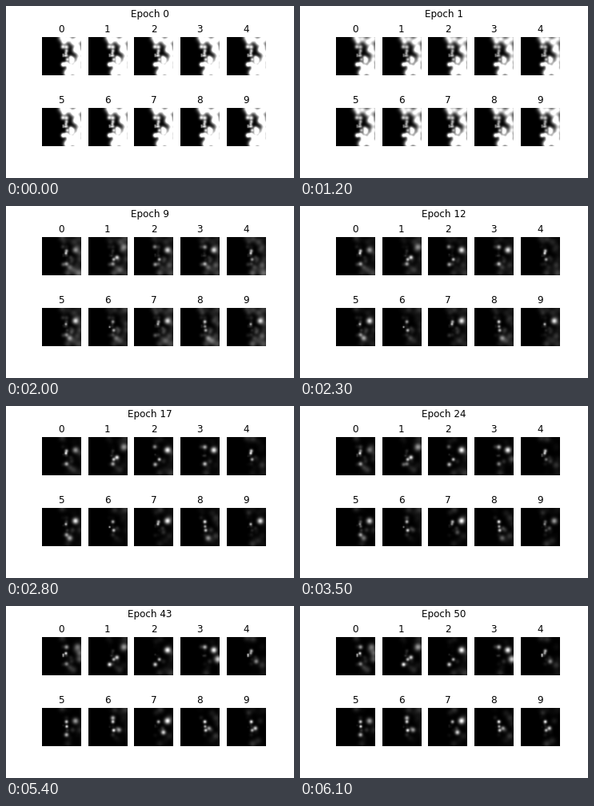
Write a matplotlib script that moves like this. It is 360 px wide and 216 px high and loops after 7.2 s.

```python
import matplotlib.pyplot as plt
import numpy as np
from matplotlib.animation import FuncAnimation

plt.rcParams["font.family"] = "DejaVu Sans"
PANELS = 10
SIZE = 48
CENTER = SIZE / 2
INTERVAL = 100
FRAMES = 72
HOLD = 11  # frames before the first training step
LAST_EPOCH = 50

# Spots near the centre of gaze; the periphery is filled with arcs.
NEAR = [
    (26, 22.5), (28.2, 24), (26, 24.5), (29.3, 21), (30, 18), (30, 13.3),
    (30.3, 23.8), (31, 28.5), (26, 34.7), (30, 34), (35, 26), (36, 31),
    (37.5, 28), (41, 17), (34, 38), (27, 7), (25.5, 13),
]

# Spots each digit relies on, brightest first, early and late in training.
EARLY = [
    [3, 4, 9, 13], [10, 7, 9, 20], [13, 7, 8, 16], [13, 9, 5], [3, 4, 7],
    [13, 3, 14, 9], [2, 7, 4], [13, 3, 4], [4, 7, 6, 14], [13, 3],
]
LATE = [
    [3, 0, 2, 5, 9, 20, 21, 22], [8, 10, 7, 20], [13, 8, 7], [13, 22, 5],
    [0, 2, 4, 3, 11], [6, 4, 9, 13], [7, 4, 5, 12], [13, 11, 4],
    [4, 7, 6, 10], [4, 10, 7],
]


def arc(radius, first, last, count):
    angles = np.radians(np.linspace(first, last, count))
    return CENTER + radius * np.column_stack([np.cos(angles), np.sin(angles)])


def ranked(choices):
    levels = np.zeros((PANELS, len(spots)))
    for row, chosen in zip(levels, choices):
        row[chosen] = .95 * .85 ** np.arange(len(chosen))
    return levels


def smoothstep(value, low, high):
    t = np.clip((value - low) / (high - low), 0, 1)
    return t * t * (3 - 2 * t)


# Spots grow with their distance from the centre of gaze.
spots = np.vstack([NEAR, arc(22.5, -88, 70, 9), arc(30, -45, 45, 2)])
distance = np.hypot(*(spots - CENTER).T)
radius = .5 + .11 * distance

rng = np.random.default_rng(4)
start = .6 + .025 * distance + .9 * smoothstep(spots[:, 1], 27, 36)
fade = rng.uniform(2.8, 5.5, (PANELS, len(spots)))
faint = .2 * rng.random((PANELS, len(spots))) ** 3
early, late = ranked(EARLY), ranked(LATE)

axis = (np.arange(2 * SIZE) + .5) / 2
gx, gy = np.meshgrid(axis, axis)
blobs = np.array([
    np.exp(-((gx - x) ** 2 + (gy - y) ** 2) / (2 * r * r))
    for (x, y), r in zip(spots, radius)
])


def levels_at(epoch):
    """Everything lights up at first, then only the useful spots remain."""
    fading = start * np.exp(-epoch / fade)
    mix = smoothstep(epoch, 14, 38)
    learned = (early * (1 - mix) + late * mix) * (1 - np.exp(-epoch / 5))
    return np.maximum(np.maximum(fading, learned), faint)


fig, axes = plt.subplots(2, 5, figsize=(5, 3), dpi=72)
fig.subplots_adjust(left=.125, right=.9, bottom=.125, top=.88,
                    wspace=.2, hspace=.2)
heading = fig.suptitle("Epoch 0", fontsize=12)
images = []
for digit, ax in enumerate(axes.flat):
    images.append(ax.imshow(np.zeros(gx.shape), cmap="gray", vmin=0, vmax=1))
    ax.set_title(str(digit), fontsize=12)
    ax.axis("off")


def update(frame):
    epoch = min(max(frame - HOLD, 0), LAST_EPOCH)
    heading.set_text(f"Epoch {epoch}")
    fields = np.tensordot(levels_at(epoch), blobs, axes=1)
    for image, field in zip(images, fields):
        image.set_data(np.clip(field, 0, 1))
    return [heading, *images]


anim = FuncAnimation(fig, update, frames=FRAMES, interval=INTERVAL,
                     repeat=True, repeat_delay=0, blit=False)
plt.show()
```
